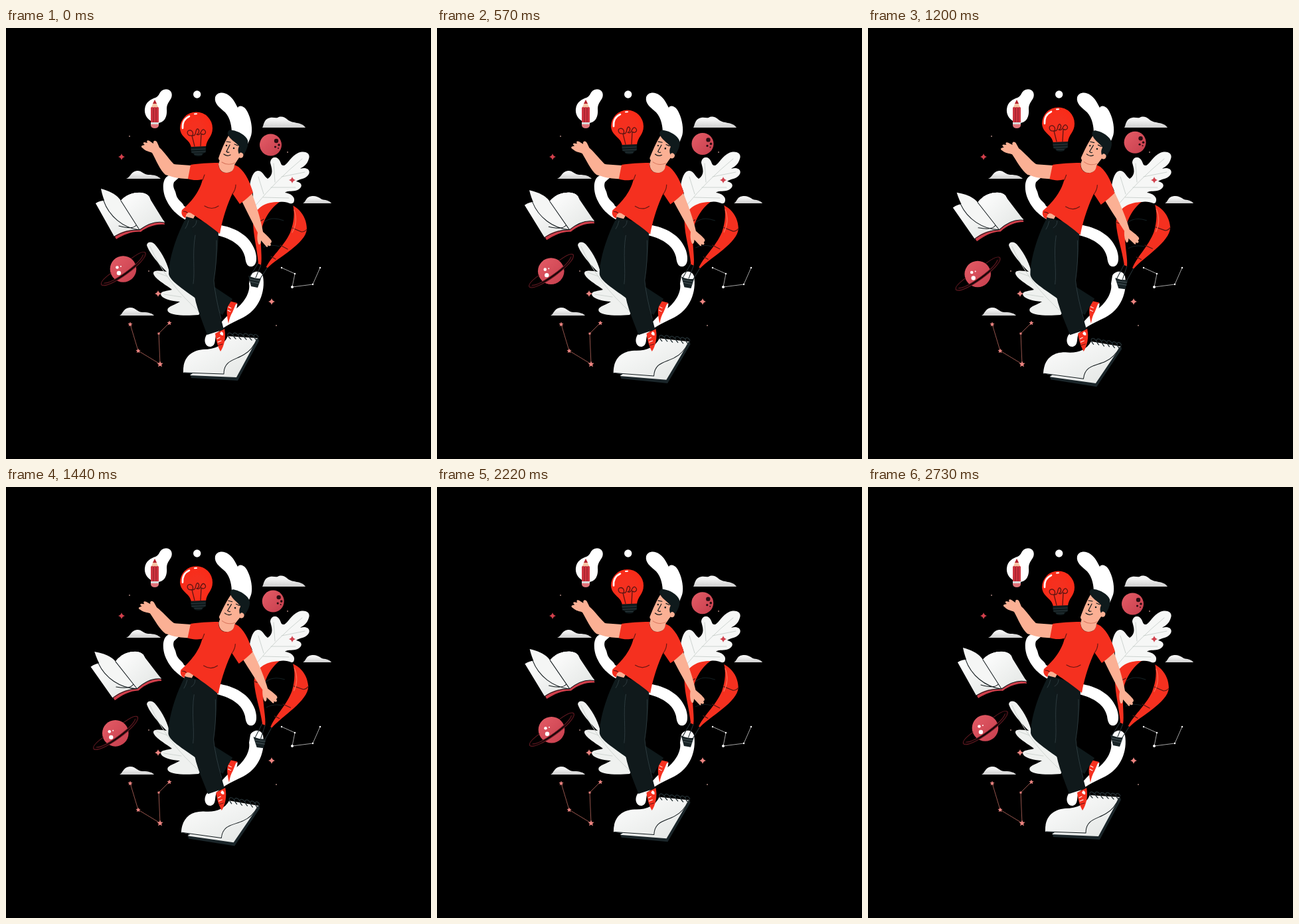
Recreate the animation shown at these times as an HTML page. Size 640 by 649 pixels, loop 2.76 s.

```html
<!DOCTYPE html>
<html lang="en">
<head>
<meta charset="utf-8">
<title>Floating ideas</title>
<style>
  html, body { margin: 0; width: 100%; height: 100%; overflow: hidden; background: #000; }
  svg { display: block; width: 100%; height: 100%; }
  .line { fill: none; stroke-linecap: round; stroke-linejoin: round; }
  .ink { stroke: #10181b; }
  .skin { fill: #fbb094; }
  .dark { fill: #0f1a1c; }
  .red { fill: #f5301f; }
</style>
</head>
<body>
<svg viewBox="0 0 640 649">
  <defs>
    <linearGradient id="cloud" x2="0" y2="1">
      <stop offset=".3" stop-color="#f2f2f2"/><stop offset="1" stop-color="#cfcfcf"/>
    </linearGradient>
    <linearGradient id="planetFill" x2="1" y2="1">
      <stop offset="0" stop-color="#e45c66"/><stop offset="1" stop-color="#c63e4d"/>
    </linearGradient>
    <linearGradient id="page" x2="1" y2="1">
      <stop offset="0" stop-color="#fff"/><stop offset="1" stop-color="#e2e5e3"/>
    </linearGradient>
    <radialGradient id="glass">
      <stop offset=".4" stop-color="#f5301f"/><stop offset="1" stop-color="#fa2b18"/>
    </radialGradient>
    <path id="sparkle" d="M0-5Q1-1 5 0Q1 1 0 5Q-1 1-5 0Q-1-1 0-5Z"/>
    <path id="star" d="M0-3.5L1-1.2 3.5-1 1.6.7 2.2 3.2 0 1.9-2.2 3.2-1.6.7-3.5-1-1-1.2Z"/>
  </defs>
  <rect width="640" height="649"/>

  <!-- white swirl -->
  <g fill="#fff">
    <circle cx="287.7" cy="100" r="5.7"/>
    <path d="M237 93C246 90 252 97 249 105C246 111 242 114 242 122C243 133 239 143 228 143C216 142 208 133 209 122C210 111 219 107 225 105C232 102 230 96 237 93Z"/>
    <path d="M315 104C318 96 328 96 335 101C343 107 345 113 349 120C351 116 357 117 361 122C369 133 373 155 368 165C364 176 361 180 357 188L340 160C340 148 338 136 330 127C322 120 313 114 315 104Z"/>
    <path d="M245 222C236 226 235 240 239 253C245 270 257 282 272 290L280 275 268 268C266 262 258 260 256 250C255 244 250 240 253 232L262 224Z"/>
    <path d="M318 296C345 300 367 312 375 335C379 348 377 357 371 359C363 361 361 353 360 345C356 328 341 318 318 312Z"/>
    <path d="M368 373C372 365 384 364 387 374C391 397 381 424 357 436C343 443 330 448 318 459C313 466 318 478 308 480C298 480 297 466 304 460C322 450 327 436 345 424C362 411 368 395 366 385Z"/>
  </g>

  <!-- leaves -->
  <path fill="#eff1ef" d="M212 327C213 321 221 321 226 328C236 340 244 356 247 372L300 420 290 432C275 433 250 434 244 427C240 420 253 418 262 412C252 412 234 408 233 401C233 396 243 396 250 394C243 388 224 378 222 370C221 363 235 366 242 367C232 357 216 340 212 327Z"/>
  <path class="line" stroke="#d0d6d2" d="M217 329Q242 385 294 430M227 368L243 374M238 401L264 405"/>
  <path fill="#f6f7f6" d="M368 267C375 254 372 246 367 237C369 226 372 216 379 215C387 215 388 223 394 227C404 220 400 211 398 203C398 196 405 192 410 197C415 202 413 208 419 207C425 204 429 193 440 188C451 184 459 189 456 197C453 207 448 208 443 212C452 209 459 213 456 220C452 228 441 227 437 231C447 233 447 240 439 244C433 247 425 244 420 248C429 249 437 255 433 263C425 268 409 261 398 266L382 276Z"/>
  <path class="line" stroke="#c9d0cc" stroke-width=".9" d="M446 197Q407 229 376 267M403 204L405 232M380 224L388 250M450 217L415 224M436 240L399 240M426 256L387 255"/>

  <!-- sky details -->
  <g fill="url(#cloud)">
    <path d="M386 150C388 147 388 140 393 137C400 133 404 136 409 135C414 132 420 134 424 138C430 144 446 141 451 150Z"/>
    <path d="M181 227C188 224 188 216 197 215C204 214 206 220 214 221C224 221 229 223 233 227Z"/>
    <path d="M447 264C452 262 451 254 461 253C471 252 473 259 481 259C486 260 489 262 490 264Z"/>
    <path d="M171 433C176 431 176 422 186 421C195 420 197 428 206 428C215 428 221 430 223 433Z"/>
  </g>
  <path class="line" stroke="#ccc" stroke-width=".8" d="M415 361L435 370 431 390 462 386 473 361"/>
  <g fill="#fff">
    <circle cx="415" cy="361" r="1.2"/><circle cx="435" cy="370" r="1.2"/><circle cx="431" cy="390" r="2"/>
    <circle cx="462" cy="386" r="1.2"/><circle cx="473" cy="361" r="1.2"/>
  </g>
  <path class="line" stroke="#b9695f" stroke-width=".8" d="M187 446L199 486 232 506 230 460 246 444"/>
  <g fill="#ec8480">
    <use href="#star" x="187" y="446"/><use href="#star" x="199" y="486"/>
    <use href="#star" transform="translate(232 506) scale(1.3)"/>
    <use href="#star" transform="translate(230 460) scale(.7)"/><use href="#star" x="246" y="444"/>
    <use href="#sparkle" x="229" y="400"/><use href="#sparkle" x="400" y="412"/>
  </g>
  <g fill="#d2404c"><use href="#sparkle" x="174" y="194"/><use href="#sparkle" x="431" y="229"/></g>
  <g fill="#a9837c">
    <circle cx="186" cy="163" r="1"/><circle cx="424" cy="187" r="1"/>
    <circle cx="215" cy="366" r="1"/><circle cx="407" cy="448" r="1"/>
  </g>

  <!-- pencil -->
  <path fill="#f6c3a4" d="M224 108L230 121H218Z"/>
  <path fill="#b5202c" d="M224 108L227 114H221Z"/>
  <path fill="#cf3440" d="M218 120Q220 118 222 120Q224 118 226 120Q228 118 230 120V142H218Z"/>
  <path class="line" stroke="#8f1824" d="M222 120V142M226 120V142"/>
  <path fill="#e0747a" d="M218 144H230V147Q229 151 224 151Q219 151 218 147Z"/>
  <path fill="#d9d9d9" d="M218 142H230V145H218Z"/>

  <g id="bulb">
    <path fill="url(#glass)" d="M262 151A24.5 24.5 0 1 1 311 151C311 164 302 167 301 179L279 180C277 167 263 166 262 151Z"/>
    <path class="line" stroke="#fff" stroke-width="2.6" d="M266 151Q265 138 276 133"/>
    <path class="line" stroke="#fff" stroke-width="2" d="M284 129.5L287 129.3"/>
    <path class="line" stroke="#5b1512" stroke-width="1.3" d="M284 178L280 162C272 163 271 154 277 154C283 155 282 163 280 162C288 164 284 151 289 152C293 155 288 162 287 160C294 164 293 151 298 153C304 157 298 163 294 159L293 178"/>
    <path class="dark" d="M278 179L301 178V187L297 189 295 192Q290 194 284 192L282 189 279 188Z"/>
    <path class="line" stroke="#354247" stroke-width=".8" d="M279 183L300 182M280 187L300 186M284 190L295 190"/>
  </g>

  <g id="planet">
    <circle cx="398.5" cy="176" r="16.5" fill="url(#planetFill)"/>
    <g fill="#2b0d12">
      <circle cx="407" cy="170" r="3.2"/><circle cx="411" cy="176" r="1.8"/>
      <circle cx="405.5" cy="179" r="1.6"/><circle cx="410" cy="181" r="1"/>
    </g>
  </g>

  <g id="saturn">
    <circle cx="176.5" cy="363" r="19.8" fill="url(#planetFill)"/>
    <g fill="#fff">
      <circle cx="167.5" cy="360.5" r="2.3"/><circle cx="170" cy="369" r="3.2"/><circle cx="173" cy="359" r="1"/>
    </g>
    <g transform="translate(176.5 362) rotate(-36)" class="line">
      <path stroke="#120406" stroke-width="3" d="M-40 0C-36 11 36 11 40 0"/>
      <path stroke="#641a22" stroke-width="1" d="M-19 -5C-38 -5 -41 -2 -41 1C-37 13 37 13 41 1C41 -2 38 -5 19 -5M-36 1C-26 9 26 9 36 1"/>
    </g>
  </g>

  <g id="book">
    <path fill="#cf3e4a" d="M163 312C175 305 188 302 201 303C212 296 225 290 238 292L239 296C226 295 213 299 203 307C190 306 178 311 166 318Z"/>
    <path fill="url(#page)" d="M135 264Q143 259 153 260L201 304C185 303 172 307 163 314Z"/>
    <path fill="url(#page)" d="M181 253C194 245 214 246 218 259L239 293C225 290 210 296 201 304Z"/>
    <path fill="#f5f6f5" d="M143 242C158 246 168 252 173 260C183 248 205 244 214 252L181 253 201 304C175 301 151 282 143 242Z"/>
    <path fill="url(#page)" d="M173 260C182 248 207 243 216 254Q219 270 239 292C225 290 210 296 201 304Z"/>
    <path class="line ink" stroke-width="1" d="M147 260C155 283 176 301 201 304L173 260M196 297Q191 304 170 298M201 304C212 296 225 290 238 293M163 314Q182 303 201 304"/>
  </g>

  <g id="balloon">
    <path class="line" stroke="#253034" stroke-width="1.1" d="M381 352L367 375M385 354L376 376M394 360L383 377"/>
    <path class="red" d="M372 290C376 266 396 261 414 262C436 264 453 280 453 303C451 325 410 345 394 361L380 355C378 330 372 312 372 290Z"/>
    <path d="M412 262C400 270 386 288 384 310C383 330 386 345 384 357L391 362C398 345 418 330 428 308C434 292 435 278 432 266C424 262 418 261 412 262Z"/>
    <path class="line" stroke="#541712" stroke-width="1.2" d="M431 301L445 307Q450 307 453 303M413 327L424 333M373 290Q379 294 388 288M399 344L406 348"/>
    <path class="line" stroke="#ff6b54" stroke-width="1.2" d="M434 274Q440 292 431 308"/>
    <path class="line" stroke="#142023" d="M389 292Q400 283 418 290M388 330Q399 325 412 329"/>
    <path fill="#182326" d="M365 373Q375 378 384 377L379 391 369 389Z"/>
    <path class="line" stroke="#526064" stroke-width=".8" d="M367 378L382 381M368 382L381 385"/>
  </g>

  <g id="pad">
    <path fill="#1a2529" d="M277 520L347 525 379 465 381 471 349 531 279 527Z"/>
    <path fill="url(#page)" d="M267 519C266 500 275 486 297 484C315 484 328 478 334 464L379 467 347 526 277 523 281 520Z"/>
    <path class="line ink" stroke-width="1" d="M268 519L328 521C328 500 345 500 358 492C369 486 374 478 378 468"/>
    <path class="line" stroke="#222e32" stroke-width="1.3" d="M338 468C329 460 337 456 341 462M346 468C337 460 345 456 349 462M354 469C345 461 353 457 357 463M362 469C353 461 361 457 365 463M370 470C361 462 369 458 373 464M377 470C369 462 376 458 380 465"/>
  </g>

  <path id="lowArm" class="skin" d="M350 250C362 275 372 295 379 308C378 314 378 320 380 325C382 328 384 324 384 320L391 328C393 331 395 330 394 327C398 330 400 327 398 324C401 323 400 320 398 318C395 314 391 311 387 307C384 290 378 270 369 245Z"/>

  <g id="legs">
    <path class="red" d="M336 411L348 414C346 424 340 436 335 445C333 436 332 428 333 422Z"/>
    <path fill="#fff" d="M346 416L348.5 415C347 428 342 437 335 445Q337 434 341 428Z"/>
    <path class="line" stroke="#fff" stroke-width="1" d="M335 420L339 422M334 425L338 427"/>
    <path class="red" d="M315 460L329 453C332 466 328 480 323 487C319 480 316 470 315 460Z"/>
    <path fill="#fff" d="M324 457Q328 458 327 463Q323 463 322 460Z"/>
    <path class="line" stroke="#fff" stroke-width="1" d="M318 468L322 466M319 473L324 471"/>
    <path class="line" stroke="#6c1510" stroke-width="1" d="M319 478L326 476"/>
    <path class="skin" d="M270 274L286 280 281 289 272 288Z"/>
    <path class="dark" d="M272 284C255 315 245 350 245 370C246 380 265 392 287 408L326 432 341 408 314 390 290 365 300 310Z"/>
    <path fill="#10191b" d="M271 284C285 288 308 292 320 303C320 330 316 360 313 380C314 405 322 430 328 454L303 462C293 435 282 410 282 385C283 360 280 340 285 315Z"/>
    <path class="line" stroke="#344347" stroke-width=".8" d="M285 312C280 340 285 365 282 385M317 320Q318 350 313 380Q315 405 324 438M275 290Q273 298 270 302M287 290Q287 297 281 300"/>
  </g>

  <path class="skin" d="M279 207L252 205C242 205 236 215 242 221Q258 228 278 227Z"/>
  <path id="forearm" class="skin" d="M255 207C247 200 238 186 231 180L228 173C226 168 221 169 222 174L216 170C213 168 211 170 213 173L208 172C206 173 207 175 209 176L205 177C203 178 204 180 206 181C211 186 216 186 220 188C226 199 232 214 240 221Q250 225 256 218Z"/>

  <g id="shirt">
    <path class="red" d="M320 203C305 203 290 204 278 206L274 227C282 230 290 229 296 228C292 246 279 262 265 274C263 280 266 285 271 286C270 280 274 276 279 279C288 285 308 298 322 310C325 292 332 268 341 249L352 265C359 260 366 254 372 248C368 234 362 219 350 209L344 206C343 214 340 218 332 218C324 218 320 212 320 203Z"/>
    <path class="line" stroke="#6b1712" stroke-width="1.2" d="M299 268Q310 275 320 268M296 229L299 221M341 250Q346 243 346 236M267 276Q271 276 273 278"/>
  </g>

  <g id="head">
    <path class="skin" d="M322 198L320 205C321 213 325 218 332 218C340 218 344 213 344 206L351 195Z"/>
    <path class="skin" d="M335 162C329 172 324 185 320 196C320 201 327 202 333 203C341 204 348 200 351 195C357 198 360 190 355 186L357 172Z"/>
    <path class="dark" d="M334 160C333 156 336 152 341 154C349 155 361 161 364 169C366 177 361 186 358 191C356 187 352 186 351 190C349 186 349 182 351 178C345 171 337 168 334 160Z"/>
    <path class="line ink" stroke-width="1.2" d="M332 171L338 172M344 175L349 177M337 176Q333 184 332 186Q334 188 336 187M328 190Q333 194 338 191"/>
    <g class="dark"><circle cx="332" cy="177" r="1.2"/><circle cx="343" cy="181" r="1.3"/></g>
    <path class="line" stroke="#d8775f" d="M325 202Q334 208 345 203"/>
  </g>
</svg>
<script>
  const LOOP = 2760, LEAD = 15;

  const turn = (deg, x, y) => k => `rotate(${deg * k} ${x} ${y})`;
  const shift = (dx, dy) => k => `translate(${dx * k} ${dy * k})`;

  const motions = {
    bulb: shift(0, -7.5),
    planet: shift(3.8, -4),
    saturn: shift(-12, 8),
    book: turn(-6, 197, 340),
    balloon: turn(-4.2, 415, 270),
    pad: k => `translate(0 ${1.5 * k}) rotate(${6 * k} 268 488)`,
    lowArm: turn(-6.2, 357, 238),
    forearm: turn(-6.3, 240, 218),
    legs: turn(-1.2, 320, 400),
    shirt: k => `translate(320 205) skewX(${-1.3 * k}) scale(1 ${1 + .017 * k}) translate(-320 -205)`,
    head: turn(4.5, 330, 208),
  };
  const parts = Object.entries(motions).map(([id, pose]) => [document.getElementById(id), pose]);

  // Out and back once per loop, softened at both ends.
  function sway(ms) {
    const phase = ((ms + LEAD) % LOOP) / LOOP;
    const linear = 1 - Math.abs(1 - 2 * phase);
    const smooth = (1 - Math.cos(2 * Math.PI * phase)) / 2;
    return .3 * linear + .7 * smooth;
  }

  function draw() {
    const k = sway(performance.now());
    for (const [part, pose] of parts) part.setAttribute('transform', pose(k));
    requestAnimationFrame(draw);
  }
  draw();
</script>
</body>
</html>
```
